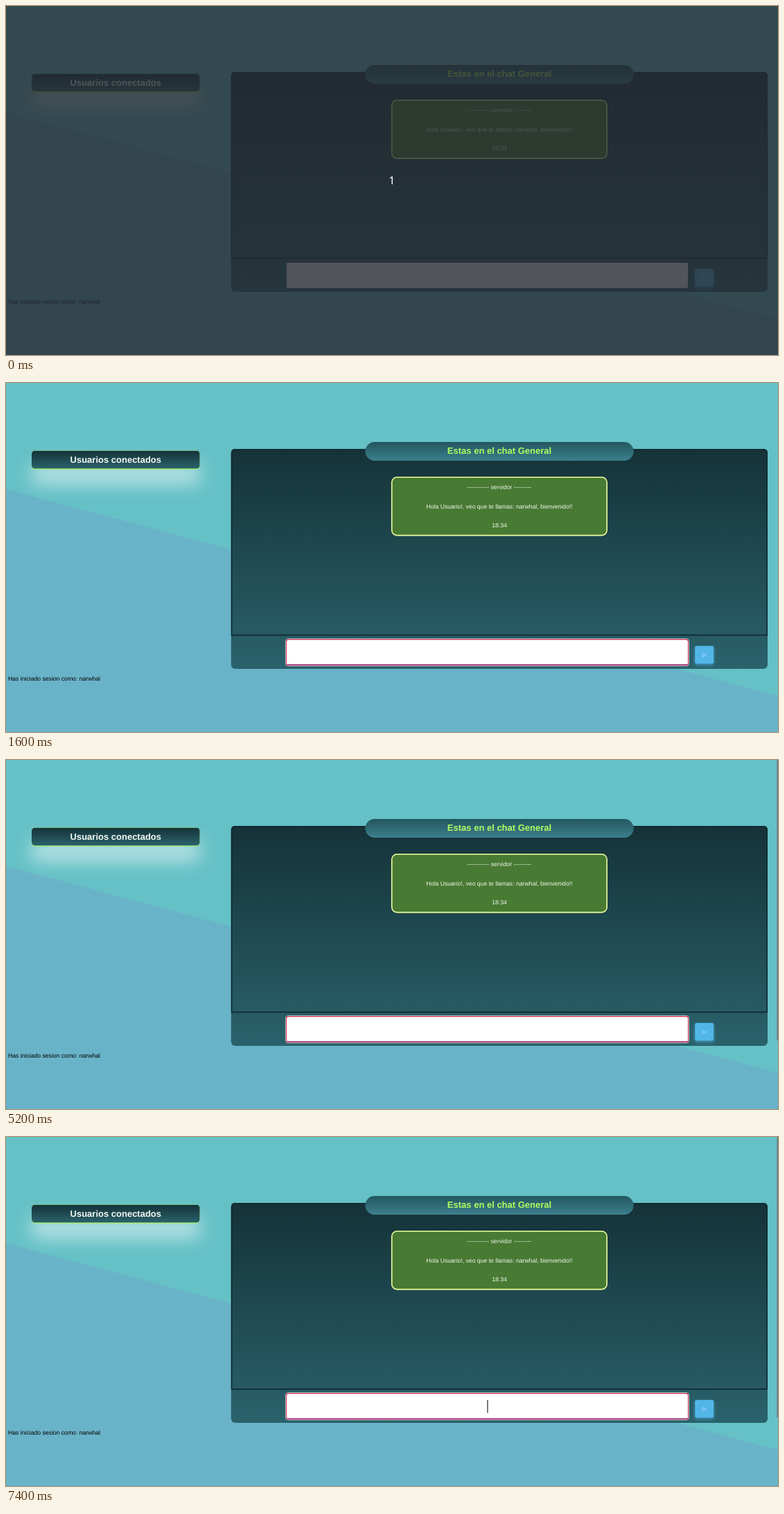
An HTML page that plays this animation: 1114x503 px, repeating every 8000 ms.

```html
<!DOCTYPE html>
<html lang="es">
<head>
<meta charset="utf-8">
<title>Chat General</title>
<style>
  html, body { margin: 0; width: 100%; height: 100%; overflow: hidden; }
  svg { display: block; background: #65c1c6; }
  text {
    font: 8.65px "Liberation Sans", Arial, sans-serif;
    text-rendering: geometricPrecision;
  }
  .mid { text-anchor: middle; }
  .head { font-size: 13px; font-weight: bold; }
  .light { fill: #f4f8f0; }
  .arrow { font: 7px "DejaVu Sans", sans-serif; fill: #fff; }
  .count { font: 16px "Noto Sans", "Open Sans", sans-serif; fill: #fff; }
  #users { filter: drop-shadow(0 20px 13.5px rgba(255, 255, 255, .6)); }
  #send { filter: drop-shadow(0 2px 2.5px rgba(82, 182, 232, .6)); }
</style>
</head>
<body>
<svg width="1114" height="503" viewBox="0 0 1114 503">
  <defs>
    <linearGradient id="deep" x2="0" y2="1">
      <stop stop-color="#153238"/><stop offset="1" stop-color="#2a626c"/>
    </linearGradient>
    <linearGradient id="pill" x2="0" y2="1">
      <stop stop-color="#22565f"/><stop offset="1" stop-color="#3c808d"/>
    </linearGradient>
    <clipPath id="rounded"><rect x="37" y="97.5" width="242.7" height="27" rx="5"/></clipPath>
  </defs>

  <path d="M0 153L1114 451V503H0Z" fill="#69b3c8"/>

  <!-- user list -->
  <rect id="users" x="37" y="97.5" width="242.7" height="27" rx="5" fill="#a9f25f"/>
  <path d="M37 97.5H279.7V118.3Q279.7 123.3 274.7 123.3H42Q37 123.3 37 118.3Z"
    fill="url(#deep)" clip-path="url(#rounded)"/>
  <text class="mid head light" x="158.3" y="115">Usuarios conectados</text>
  <text x="3.1" y="428.7">Has iniciado sesion como: narwhal</text>

  <!-- chat -->
  <rect x="324.8" y="95" width="774.2" height="317" rx="6" fill="url(#deep)"/>
  <path d="M325.6 363.4V100.8Q325.6 95.8 330.6 95.8H1093.2Q1098.2 95.8 1098.2 100.8V363.4Z"
    fill="none" stroke="#0e2a30" stroke-width="1.6"/>
  <rect x="518.4" y="85" width="387.2" height="27" rx="13.5" fill="url(#pill)"/>
  <text class="mid head" x="712" y="102" fill="#b0fc60">Estas en el chat General</text>
  <rect x="556.7" y="135.8" width="310.4" height="83.8" rx="7.5"
    fill="#487a33" stroke="#efffa0" stroke-width="1.6"/>
  <g class="mid light">
    <text x="712" y="153">----------- servidor ---------</text>
    <text x="712" y="180.6">Hola Usuario!, veo que te llamas: narwhal, bienvenido!!</text>
    <text x="712" y="208">18:34</text>
  </g>

  <!-- message field -->
  <rect id="field" x="404.9" y="370" width="579.2" height="36.4" rx="2.2"/>
  <rect id="line" x="405.5" y="405.2" width="578" height="1.4" fill="#9440ae"/>
  <g id="ring" fill="none">
    <rect x="403.6" y="368.7" width="581.8" height="39" rx="3.4" stroke="#fff" stroke-width=".8"/>
    <rect x="404.5" y="369.6" width="580" height="37.2" rx="2.6" stroke="#d02c4c" stroke-width="1.1"/>
  </g>
  <rect id="caret" x="694.4" y="379" width="1.1" height="18.6" fill="#111"/>
  <rect id="send" x="994.2" y="379" width="27" height="25.5" rx="2.2" fill="#52b6e8"/>
  <text class="mid arrow" x="1008" y="394.4">▷</text>

  <rect id="bar" x="1112.5" y="0" width="1.5" height="404.3" fill="#6d7478"/>
  <g id="shade">
    <rect width="1114" height="503" fill="#26292f" opacity=".79"/>
    <text class="mid count" x="556.8" y="257.3">1</text>
  </g>
</svg>
<script>
  const LOOP = 8000, TICK = 100, FADE = 500;
  const FOCUS = 500, BLUR = 5400, REFOCUS = 5900;
  const blinks = [FOCUS, 1600, 2600, 2900, 4000, 5200, REFOCUS, 7000, 7300];

  const $ = id => document.getElementById(id);
  const show = (id, on) => $(id).setAttribute("opacity", +on);

  function ease(ms) {
    const p = Math.min(1, Math.max(0, ms / FADE));
    return p * p * (3 - 2 * p);
  }

  // Strength of the field's focus style, 0 to 1.
  const focus = t => ease(t - FOCUS) - ease(t - BLUR) + ease(t - REFOCUS);

  function draw(t) {
    const f = focus(t), grey = 245 + Math.round(10 * f);
    show("shade", t < TICK);
    $("field").setAttribute("fill", `rgb(${grey},${grey},${grey})`);
    show("line", f * f);
    show("ring", t >= FOCUS && t < BLUR || t >= REFOCUS);
    show("caret", blinks.filter(b => b <= t).length % 2);
    show("bar", t >= 4200 && (t < 7300 || t >= 7400));
  }

  const start = performance.now();
  function loop() {
    const t = (performance.now() - start) % LOOP;
    draw(Math.floor(t / TICK) * TICK);
    requestAnimationFrame(loop);
  }
  loop();
</script>
</body>
</html>
```
